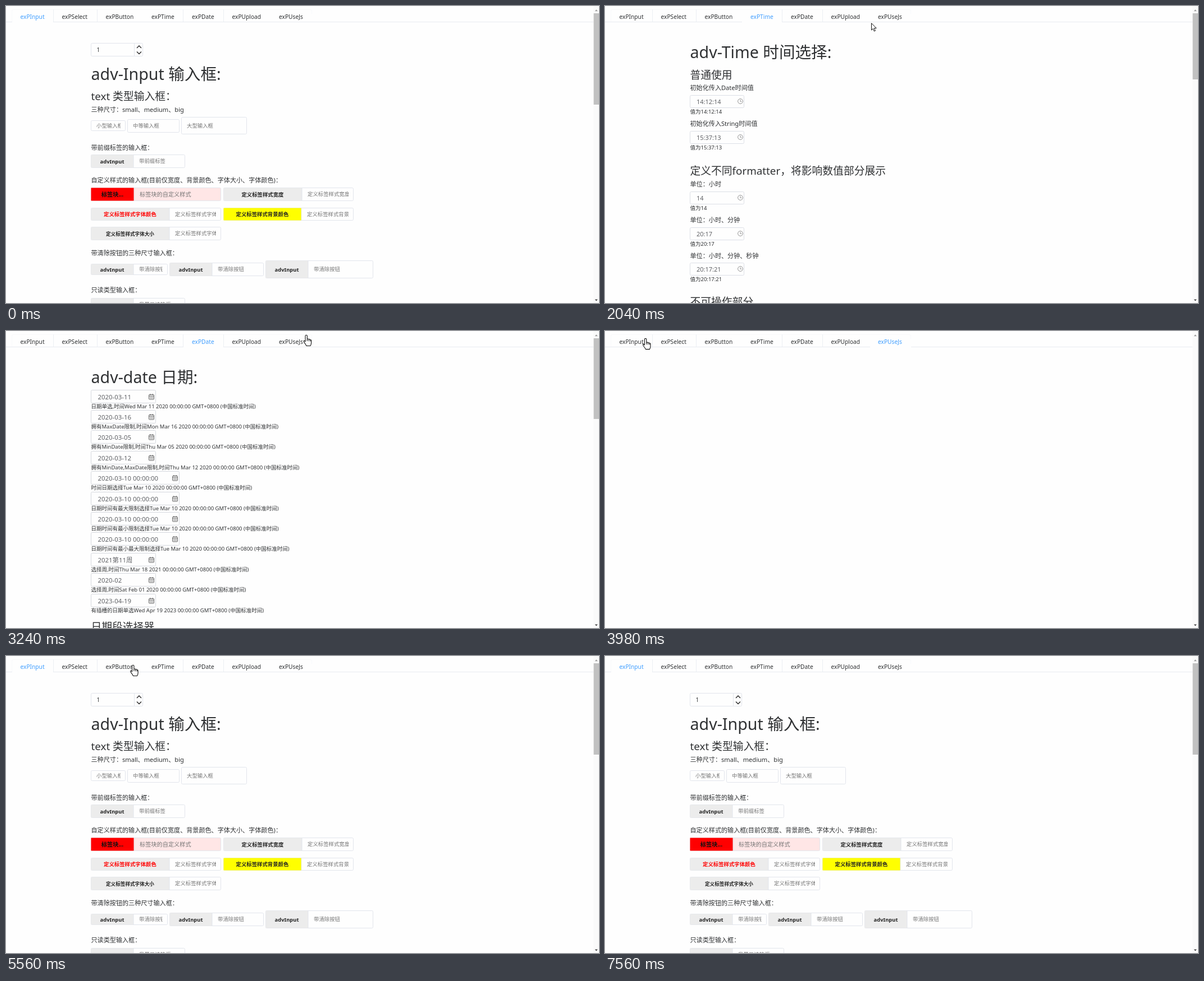
An HTML page that plays this animation: 1056 px wide and 530 px high, repeating every 8.53 s.

```html
<!DOCTYPE html>
<html lang="zh-CN">
<head>
<meta charset="utf-8">
<title>Component tabs</title>
<style>
html, body { margin: 0; width: 100%; height: 100%; overflow: hidden; background: #fefefe; }
svg { display: block; }
text { font-family: "Noto Sans", "Noto Sans CJK SC", "Noto Sans CJK", sans-serif; }
</style>
</head>
<body>
<svg id="stage" width="100%" height="100%" viewBox="0 0 1056 530" lang="zh-CN"></svg>
<script>
const LOOP = 8530;
const INK = '#2f3133', GREY = '#606266', HINT = '#757575', LINE = '#e2e5ec', BLUE = '#409eff';
const COLON = '\uFF1A', COMMA = '\uFF0C'; // full-width punctuation

// y is the vertical middle of the line of text
const text = (x, y, size, str, { fill = INK, anchor = 'start', weight = 400 } = {}) =>
  `<text x="${x}" y="${(y + size * 0.37).toFixed(2)}" font-size="${size}" fill="${fill}" text-anchor="${anchor}" font-weight="${weight}">${str}</text>`;
const mid = (x, y, size, str, opt = {}) => text(x, y, size, str, { anchor: 'middle', ...opt });
const box = (x, y, w, h, { fill = '#fefefe', stroke = LINE, r = 2 } = {}) =>
  `<rect x="${x + 0.5}" y="${y + 0.5}" width="${w - 1}" height="${h - 1}" rx="${r}" fill="${fill}" stroke="${stroke}"/>`;
const rect = (x, y, w, h, fill) => `<rect x="${x}" y="${y}" width="${w}" height="${h}" fill="${fill}"/>`;
const path = (d, stroke, width = 1, extra = '') =>
  `<path d="${d}" stroke="${stroke}" stroke-width="${width}" fill="none" ${extra}/>`;

const title = (y, str) => text(151.5, y, 28.6, str);
const head = (y, str) => text(151.5, y, 18.8, str);
const body = (y, str) => text(151.5, y, 11.1, str);
const note = (y, str) => text(151.5, y, 9.5, str);
const chevron = (x, y, s = 1, r = 3.4) =>
  path(`M${x - r} ${y - s * r / 2}L${x} ${y + s * r / 2}L${x + r} ${y - s * r / 2}`, '#222', 1.3);

function field(x, y, w, h, hint, size = 9.4) {
  return box(x, y, w, h) + inner(x, y, w, h, hint, size);
}
function inner(x, y, w, h, hint, size = 9.4) {
  return `<svg x="${x + 9}" y="${y}" width="${w - 18}" height="${h}">${text(1, h / 2, size, hint, { fill: HINT })}</svg>`;
}
function tagged(x, y, w, h, tagW, label, hint, o = {}) {
  const { bg = '#ececec', fieldBg = '#fefefe', color = '#222', size = 9.4, hintSize = 9.4 } = o;
  return box(x, y, w, h, { fill: fieldBg }) + rect(x + 0.5, y + 0.5, tagW - 0.5, h - 1, bg) +
    path(`M${x + tagW} ${y}v${h}`, LINE) +
    mid(x + tagW / 2, y + h / 2 + 0.5, size, label, { fill: color, weight: 700 }) +
    inner(x + tagW, y, w - tagW, h, hint, hintSize);
}
function select(x, y, w, h, value, size = 9.5) {
  return box(x, y, w, h) + mid(x + w / 2, y + h / 2 + 0.5, size, value) + chevron(x + w - 5.5, y + h / 2 + 1);
}
function button(x, y, w, h, label, { color, r = 2, size = 11.2 } = {}) {
  return box(x, y, w, h, { fill: color || '#fefefe', stroke: color || '#dcdfe6', r }) +
    mid(x + w / 2, y + h / 2, size, label, { fill: color ? '#fff' : GREY, weight: 500 });
}
function timeBox(y, value) {
  return box(151, y, 97, 23, { stroke: '#dcdfe6' }) + text(163, y + 12, 11, value, { fill: GREY }) +
    `<circle cx="241" cy="${y + 11}" r="4.4" fill="none" stroke="#888" stroke-width=".9"/>` +
    path(`M241 ${y + 8.3}v3h2.4`, '#888', 0.9) + note(y + 29.7, '值为' + value);
}
function dateBox(y, value, caption) {
  const w = value.length > 12 ? 158 : 116, x = 151 + w - 12.5;
  return box(151, y, w, 24, { stroke: '#d5d8de' }) + text(163.5, y + 12.3, 11.4, value, { fill: GREY }) +
    `<rect x="${x}" y="${y + 8.5}" width="9" height="8.5" rx="1" fill="none" stroke="#555" stroke-width=".9"/>` +
    path(`M${x} ${y + 11}h9M${x + 2.3} ${y + 7}v2.5M${x + 6.7} ${y + 7}v2.5`, '#555', 0.9) +
    path(`M${x + 1.6} ${y + 13}h6M${x + 1.6} ${y + 15}h6`, '#555', 1, 'stroke-dasharray="1.4 .9"') +
    note(y + 29.5, caption);
}

function inputPage() {
  return box(151, 66, 93, 24) + path('M228.5 66v24', LINE) + text(161.5, 78.5, 10, '1') +
    chevron(237, 73, -1, 4) + chevron(237, 83.5, 1, 4) +
    title(121.5, 'adv-Input 输入框:') + head(161, 'text 类型输入框' + COLON) +
    body(185, `三种尺寸${COLON}small、medium、big`) +
    field(151, 204, 62, 19, '小型输入框') + field(216, 202, 93, 24, '中等输入框') + field(312, 198, 117, 31, '大型输入框') +
    body(252.5, '带前缀标签的输入框' + COLON) + tagged(151, 265, 168, 24, 76, 'advInput', '带前缀标签') +
    body(310.5, '自定义样式的输入框(目前仅宽度、背景颜色、字体大小、字体颜色)' + COLON) +
    tagged(151, 324, 232, 24, 77, '标签块...', '标签块的自定义样式', { bg: '#f00', fieldBg: '#ffe6e6', color: '#111', size: 10.2, hintSize: 10.2 }) +
    tagged(387, 324, 232, 24, 140, '定义标签样式宽度', '定义标签样式宽度') +
    tagged(151, 360, 232, 23, 140, '定义标签样式字体颜色', '定义标签样式字体颜色', { color: '#f00' }) +
    tagged(387, 360, 232, 23, 139, '定义标签样式背景颜色', '定义标签样式背景颜色', { bg: '#ff0' }) +
    tagged(151, 394, 232, 24, 140, '定义标签样式字体大小', '定义标签样式字体大小', { size: 8.6 }) +
    body(441, '带清除按钮的三种尺寸输入框' + COLON) +
    tagged(151, 460, 137, 20, 76, 'advInput', '带清除按钮') +
    tagged(291, 458, 168, 24, 76, 'advInput', '带清除按钮') +
    tagged(462, 454, 192, 32, 76, 'advInput', '带清除按钮') +
    body(507, '只读类型输入框' + COLON) + tagged(151, 521, 168, 24, 76, 'advInput', '我是只读的框');
}
function selectPage() {
  const labelled = (x, w, value) => select(x, 243, w, 23, '') + rect(x + 0.5, 243.5, 82, 22, '#e9eaec') +
    mid(x + 41, 255, 9.8, 'adv-Select', { weight: 700, fill: '#222' }) + mid(x + 128, 255, 9.4, value);
  return title(82.5, 'adv-select 下拉框:') + head(123, '小、中、大型下拉框:') +
    select(155, 146, 78, 19, 'guangdong') + select(240, 144, 94, 23, 'beijing') + select(340, 140, 117, 31, 'guangdong') +
    head(206, '不同的mode') + body(230, `mode为1为 name-value 形式${COMMA} mode为2为 name 形式`) +
    labelled(155, 174, 'beijing') + labelled(337, 175, '北京') +
    head(301, '多选下拉:') +
    select(155, 318, 93, 24, '') + text(165, 330.5, 9.5, 'guangdong,b...') +
    select(255, 318, 94, 24, '') + text(266, 330.5, 9.7, 'ABCDEFGHIJK...') +
    head(377, '有默认选择项的下拉(赋值给value数组即可)') +
    body(400, 'mode 为 1') + select(155, 413, 93, 24, '') +
    body(450, 'mode 为 2') + select(155, 464, 93, 24, '北京,广东', 9.4) +
    body(501, '单选的情况') + select(155, 514, 93, 24, 'guangdong');
}
function buttonPage() {
  const colors = ['', BLUE, '#67c23a', '#909399', '#e6a23c', '#f56c6c'];
  const row = (y, r) => colors.map((color, i) => button(155 + Math.round(i * 87.8), y, 77, 23, 'adv-Button', { color, r })).join('');
  return title(82.5, 'adv-button 按钮:') +
    button(155, 109, 50, 19, '小型默认', { size: 9.5 }) + button(215, 106, 63, 24, '中型默认', { size: 10.9 }) +
    button(288, 104, 69, 28, '大型默认', { size: 10.9 }) +
    row(145, 1.5) + row(180, 11) + button(155, 215, 77, 23, 'adv-Button') +
    head(264, '事件测试(Console):') +
    body(287, '传入 btnClickFunc 属性用于内部 单击 触发') + button(155, 300, 77, 23, 'adv-Button', { color: BLUE }) +
    body(337.5, '传入 btnDBClickFunc 属性用于内部 双击 触发') + button(155, 351, 77, 23, 'adv-Button', { color: BLUE });
}
function timePage() {
  const unit = (y, str) => body(y, `单位${COLON}${str}`);
  return title(82.5, 'adv-Time 时间选择:') + head(123, '普通使用') +
    body(146, '初始化传入Date时间值') + timeBox(159, '14:12:14') +
    body(210, '初始化传入String时间值') + timeBox(223, '15:37:13') +
    head(294.5, `定义不同formatter${COMMA}将影响数值部分展示`) +
    unit(318, '小时') + timeBox(331, '14') +
    unit(381.5, '小时、分钟') + timeBox(395, '20:17') +
    unit(445.5, '小时、分钟、秒钟') + timeBox(458, '20:17:21') +
    head(528, '不可操作部分');
}
function datePage() {
  const long = '2020-03-10 00:00:00';
  const rows = [
    ['2020-03-11', '日期单选,时间', 'Wed Mar 11 2020'],
    ['2020-03-16', '拥有MaxDate限制,时间', 'Mon Mar 16 2020'],
    ['2020-03-05', '拥有MinDate限制,时间', 'Thu Mar 05 2020'],
    ['2020-03-12', '拥有MinDate,MaxDate限制,时间', 'Thu Mar 12 2020'],
    [long, '时间日期选择', 'Tue Mar 10 2020'],
    [long, '日期时间有最大限制选择', 'Tue Mar 10 2020'],
    [long, '日期时间有最小限制选择', 'Tue Mar 10 2020'],
    [long, '日期时间有最小最大限制选择', 'Tue Mar 10 2020'],
    ['2021第11周', '选择周,时间', 'Thu Mar 18 2021'],
    ['2020-02', '选择周,时间', 'Sat Feb 01 2020'],
    ['2023-04-19', '有插槽的日期单选', 'Wed Apr 19 2023']
  ];
  return title(82.5, 'adv-date 日期:') +
    rows.map(([value, label, day], i) =>
      dateBox(Math.round(104.5 + i * 36.4), value, `${label}${day} 00:00:00 GMT+0800 (中国标准时间)`)).join('') +
    head(528.5, '日期段选择器');
}

// name, text x, left edge, right edge, bottom of scroll thumb, content
const tabs = [
  ['exPInput', 25.5, 10, 84, 176, inputPage],
  ['exPSelect', 99.5, 84, 162, 268, selectPage],
  ['exPButton', 177.5, 162, 243, 469, buttonPage],
  ['exPTime', 259, 243, 315, 131, timePage],
  ['exPDate', 331, 315, 387, 157, datePage],
  ['exPUpload', 402.5, 387, 471, 0, () => ''],
  ['exPUseJs', 486, 471, 545, 0, () => '']
];
const stage = document.getElementById('stage');
stage.innerHTML =
  tabs.map(t => `<g class="page">${t[5]()}</g>`).join('') +
  rect(0, 0, 1046, 29, '#fefefe') + path('M0 28.5H1046', '#e8ebf1') +
  path('M10.5 28V9Q10.5 6.5 13 6.5H542Q544.5 6.5 544.5 9V14', '#f8f9fb') +
  [84, 162, 315, 387].map(x => path(`M${x + 0.5} 6V28`, '#eceff4')).join('') +
  '<rect id="gap" y="28" height="1" fill="#fefefe"/>' +
  tabs.map(t => text(t[1], 19, 10.2, t[0]).replace('<text', '<text class="tab"')).join('') +
  rect(1046, 0, 10, 530, '#fafafa') + '<rect id="thumb" x="1046.5" y="13" width="9.5" fill="#c1c1c1"/>' +
  '<path d="M1048.7 9.2h5l-2.5-3z" fill="#999"/><path d="M1048.7 523.5h5l-2.5 3z" fill="#444"/>' +
  '<g id="cursor"><circle id="press" cy="0" r="9" fill="#f7ee1c" opacity=".7"/>' +
  '<path id="hand" d="M-2 12V2Q-2 .3-.3 .3Q1.4 .3 1.4 2V7.5Q3 6.3 4.3 8Q6 7 7 8.8Q8.6 8.3 8.6 10.5V14Q8.6 17 7 19.5H0Q-1 17-4 13.4Q-5.3 11-4.3 10.3Q-3.3 10-2 12ZM1.4 7.5V11M4.3 8.2V11.2M7 9V11.5" fill="#fff" stroke="#111" stroke-width="1.1" stroke-linejoin="round"/>' +
  '<path id="arrow" d="M.5 .7V13L3.3 10.4L5.3 15L7.4 14.1L5.4 9.6H9.2Z" fill="#fff" stroke="#111" stroke-width="1" stroke-linejoin="round"/></g>';

const $ = id => document.getElementById(id);
const pages = [...stage.querySelectorAll('.page')], labels = [...stage.querySelectorAll('.tab')];

// time and tab that opens
const opens = [[0, 0], [730, 1], [1310, 2], [1730, 3], [2670, 4], [3530, 6], [4290, 0], [5770, 2], [6510, 1], [7040, 0]];
// time and pointer tip
const route = [
  [60, 420, 540], [600, 125, 11], [950, 126, 12], [1180, 186, 20.5], [1320, 186, 20.5], [1600, 279, 18],
  [1890, 281, 18], [2040, 474, 30], [2250, 490, 38], [2550, 352, 18], [2780, 352, 18], [3240, 535, 7],
  [3400, 519, 14], [3650, 519, 14], [4070, 14, 13], [4260, 14, 13], [4690, 446, 35], [5100, 490, 38],
  [5200, 490, 38], [5640, 202, 14], [6120, 202, 16], [6400, 124.5, 20.5], [6540, 124.5, 20.5],
  [6720, 36, 18], [7080, 36, 18], [7550, 300, 540]
];

function pointer(t) {
  const i = route.findIndex(k => k[0] > t);
  if (i < 1) return null;
  const [t0, x0, y0] = route[i - 1], [t1, x1, y1] = route[i];
  const p = (t - t0) / (t1 - t0), e = p * p * (3 - 2 * p);
  return [x0 + (x1 - x0) * e, y0 + (y1 - y0) * e];
}

let shown = -1;
function show(active) {
  if (active === shown) return;
  shown = active;
  const [, , left, right, bottom] = tabs[active];
  pages.forEach((p, i) => p.setAttribute('display', i === active ? 'inline' : 'none'));
  labels.forEach((l, i) => l.setAttribute('fill', i === active ? BLUE : INK));
  $('gap').setAttribute('x', left + 1);
  $('gap').setAttribute('width', right - left - 1);
  $('thumb').setAttribute('height', Math.max(0, bottom - 13));
}

function draw(t) {
  show(opens.filter(o => o[0] <= t).pop()[1]);
  const tip = pointer(t);
  $('cursor').setAttribute('display', tip ? 'inline' : 'none');
  if (!tip) return;
  const [x, y] = tip;
  const over = y < 28.5 && x > 10 && x < 545;
  const down = opens.some(o => o[0] && t >= o[0] - 120 && t < o[0] + 10);
  $('cursor').setAttribute('transform', `translate(${x.toFixed(1)} ${y.toFixed(1)})`);
  $('hand').setAttribute('display', over ? 'inline' : 'none');
  $('arrow').setAttribute('display', over ? 'none' : 'inline');
  $('press').setAttribute('display', down ? 'inline' : 'none');
}

const start = performance.now();
function tick() {
  draw((performance.now() - start) % LOOP);
  requestAnimationFrame(tick);
}
tick();
</script>
</body>
</html>
```
